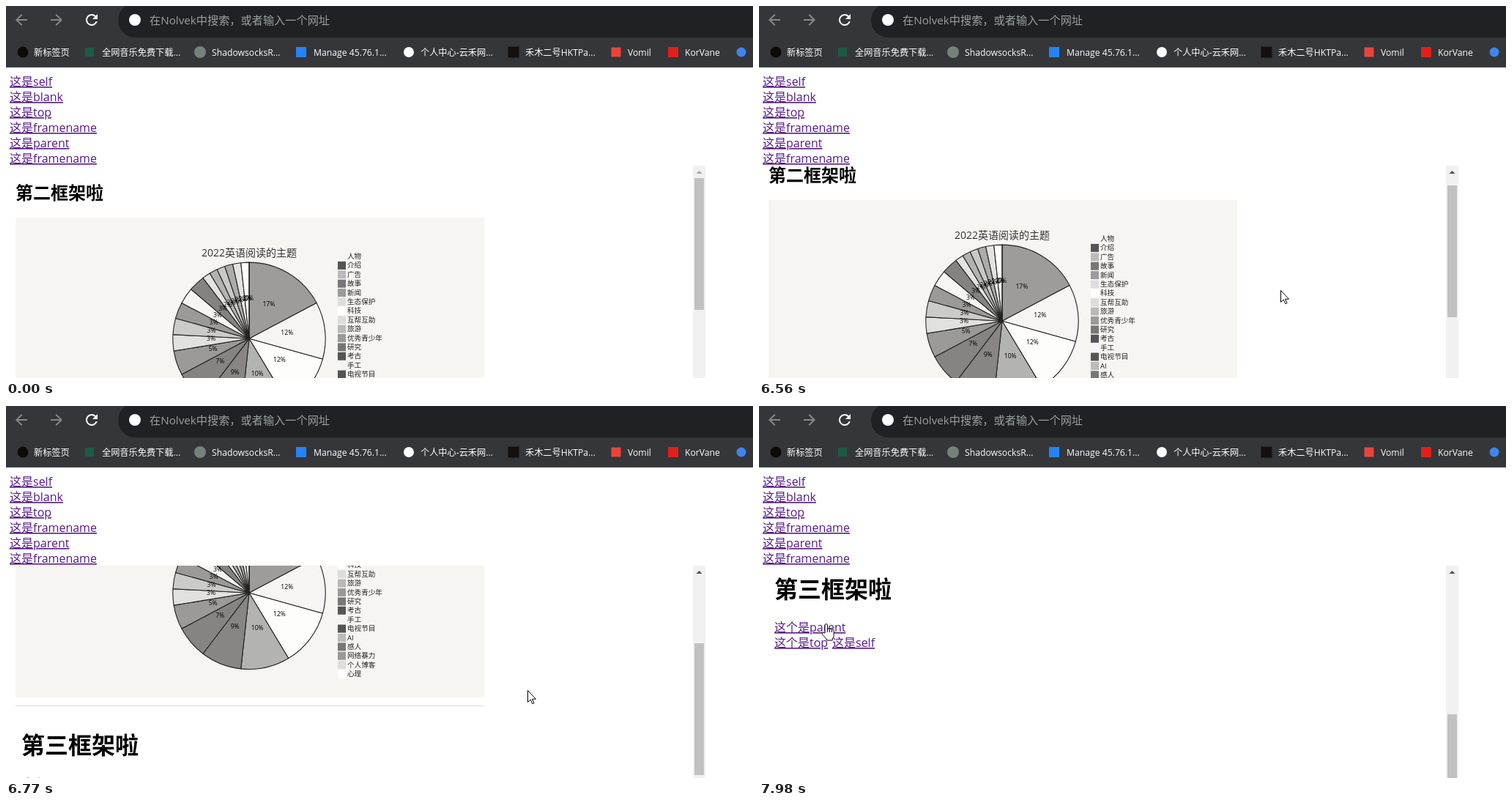
Write an HTML page that moves like this. It is 1020x508 px and loops after 8000 ms.

```html
<!DOCTYPE html>
<html lang="zh-CN">
<head>
<meta charset="utf-8">
<title>框架</title>
<style>
@property --scroll { syntax: "<number>"; inherits: true; initial-value: 0; }
html, body { margin: 0; width: 100%; height: 100%; overflow: hidden; background: #fff; }
svg { display: block; width: 1020px; height: 508px; color: #a3a3a3; animation: scroll 8s step-end infinite; }
text { font: 16px "Open Sans", "Noto Sans CJK SC", "Noto Sans CJK", sans-serif; }
.marks text { font-size: 12.2px; font-weight: 500; fill: #fff; }
.link { fill: #551a8b; text-decoration: underline 1px; }
.h2 { font-size: 24px; font-weight: 700; }
.h1 { font-size: 32px; font-weight: 700; }
.title { font-size: 14px; fill: #333; text-anchor: middle; }
.key { font-size: 9.6px; fill: #222; }
.pct { font-size: 8.6px; text-anchor: middle; }
.doc { transform: translateY(calc(var(--scroll) * -1px)); }
.thumb { transform: translateY(round(down, calc(var(--scroll) * .4515px), 1px)); }
.pointer { animation: move 8s step-end infinite; }
.hand { opacity: 0; animation: grab 8s step-end infinite; }

@keyframes scroll {
  0% { --scroll: 0; color: #a3a3a3; }
  82% { --scroll: 24; color: #505050; }
  82.875% { --scroll: 60; color: #505050; }
  83.75% { --scroll: 109; color: #505050; }
  84.625% { --scroll: 199; color: #505050; }
  85.5% { --scroll: 285; color: #505050; }
  86.375% { --scroll: 353; color: #505050; }
  87.25% { --scroll: 396; color: #505050; }
  88.125%, 100% { --scroll: 412; color: #505050; }
}
@keyframes move {
  0% { transform: translate(-50px, -50px); }
  3.25% { transform: translate(727px, 468px); }
  4.125% { transform: translate(748px, 440px); }
  5% { transform: translate(772px, 414px); }
  5.875% { transform: translate(785px, 400px); }
  7.25% { transform: translate(778px, 394px); }
  8.125% { transform: translate(772px, 392px); }
  13% { transform: translate(756px, 384px); }
  13.875% { transform: translate(718px, 364px); }
  14.75% { transform: translate(688px, 347px); }
  15.625% { transform: translate(677px, 340px); }
  20.75% { transform: translate(690px, 350px); }
  21.625% { transform: translate(738px, 380px); }
  22.5% { transform: translate(812px, 418px); }
  23.375% { transform: translate(884px, 452px); }
  24.25% { transform: translate(930px, 478px); }
  25.125% { transform: translate(944px, 489px); }
  26% { transform: translate(924px, 482px); }
  26.875% { transform: translate(868px, 460px); }
  27.75% { transform: translate(800px, 430px); }
  28.625% { transform: translate(748px, 406px); }
  29.5% { transform: translate(720px, 392px); }
  30.375% { transform: translate(712px, 388px); }
  97.125% { transform: translate(610px, 374px); }
  98% { transform: translate(368px, 340px); }
  98.875% { transform: translate(160px, 308px); }
  99.75%, 100% { transform: translate(-50px, -50px); }
}
@keyframes grab {
  0% { opacity: 0; }
  99.75%, 100% { opacity: 1; }
}
</style>
</head>
<body>
<svg viewBox="0 0 1020 508">
  <clipPath id="view"><rect y="218" width="938" height="290"/></clipPath>
  <clipPath id="track"><rect x="938" y="218" width="17" height="290"/></clipPath>
  <rect width="1020" height="508" fill="#fff"/>

  <rect width="1020" height="83" fill="#35363a"/>
  <rect y="83" width="1020" height="1" fill="#4a4c50"/>
  <rect x="153" y="-4" width="900" height="47" rx="23.5" fill="#202124"/>
  <g fill="#85878a">
    <path id="back" transform="translate(9 7)" d="M20 11H7.830L13.420 5.410L12 4L4 12L12 20L13.410 18.590L7.830 13H20Z"/>
    <use href="#back" transform="matrix(-1 0 0 1 90 0)"/>
    <path fill="#fff" transform="translate(105 7)" d="M17.650 6.350A8 8 0 1 0 19.730 14H17.650A6 6 0 1 1 16.220 7.780L13 11H20V4Z"/>
  </g>
  <circle cx="176" cy="19" r="8" fill="#fff"/>
  <text x="196" y="25" fill="#9aa0a6" style="font-size:15.2px">在Nolvek中搜索，或者输入一个网址</text>
  <g class="marks" id="marks"></g>

  <g id="links"></g>

  <g clip-path="url(#view)">
    <g class="doc">
      <text class="h2" x="13" y="264">第二框架啦</text>
      <rect x="13" y="289" width="640" height="308" fill="#f6f5f2"/>
      <text class="title" x="332" y="342">2022英语阅读的主题</text>
      <g id="chart"></g>
      <rect x="13" y="608" width="640" height="1" fill="#dcdcdc"/>
      <text class="h1" x="21" y="674">第三框架啦</text>
      <text class="link" x="21" y="720">这个是parent</text>
      <text class="link" x="21" y="741">这个是top</text>
      <text class="link" x="100" y="741">这是self</text>
    </g>
  </g>

  <g clip-path="url(#track)">
    <rect x="938" y="218" width="17" height="290" fill="#f1f1f1"/>
    <rect class="thumb" x="940" y="235" width="13" height="180" fill="#c1c1c1"/>
    <path d="M942.500 229L946.500 225L950.500 229Z" fill="currentColor"/>
  </g>

  <g fill="#fff" stroke="#000" stroke-linejoin="round">
    <path class="pointer" d="M.5 .5V16.500L4.200 13L6.800 18.700L9 17.700L6.500 12.200H11.500Z"/>
    <g class="hand"><path transform="translate(85 297)" d="M5 13V2.300a1.700 1.700 0 0 1 3.400 0V8a1.600 1.600 0 0 1 3 .3a1.600 1.600 0 0 1 3 .6a1.500 1.500 0 0 1 2.800 .8V16q0 3-2 5V23H7.500V21.500L2 15.500q-1.600-2-.6-3q1-.9 3.600 .5ZM8.400 8V12M11.400 8.500V12M14.400 9V12"/></g>
  </g>
</svg>
<script>
const byId = id => document.getElementById(id);

function add(parent, tag, attrs, text) {
  const el = document.createElementNS("http://www.w3.org/2000/svg", tag);
  for (const k in attrs) el.setAttribute(k, attrs[k]);
  if (text) el.textContent = text;
  return parent.appendChild(el);
}

// Bookmarks: icon centre, size, corner radius, colour, label position, label
[
  [23, 15, 8, "#0d0b0a", 38, "新标签页"],
  [114, 12, 0, "#1d5a45", 131, "全网音乐免费下载..."],
  [265, 16, 8, "#75827a", 281, "ShadowsocksR..."],
  [403, 14, 0, "#2583f5", 420, "Manage 45.76.1..."],
  [550, 14, 7, "#fff", 566, "个人中心-云禾网..."],
  [693, 15, 0, "#150f10", 709, "禾木二号HKTPa..."],
  [833, 13, 0, "#e8453a", 849, "Vomil"],
  [911, 14, 0, "#e0201b", 927, "KorVane"],
  [1004, 13, 7, "#3f86e8", 0, ""]
].forEach(([cx, size, rx, fill, x, label]) => {
  add(byId("marks"), "rect", { x: cx - size / 2, y: 63 - size / 2, width: size, height: size, rx, fill });
  if (label) add(byId("marks"), "text", { x, y: 68 }, label);
});

["self", "blank", "top", "framename", "parent", "framename"].forEach((name, i) =>
  add(byId("links"), "text", { class: "link", x: 5, y: 109 + 21 * i }, "这是" + name));

// Pie: counts run clockwise from the top
const chart = byId("chart"), cx = 332, cy = 454.3, R = 104.2;
const counts = [10, 7, 7, 6, 5, 4, 3, 2, 2, 2, 2, 2, 1, 1, 1, 1, 1, 1, 0];
const shades = "9e9c9a f6f5f3 fdfdfb b3b3b1 888684 868482 9c9a98 e1e1df cbcbc9 9c9a98 f5f5f3 858381 e3e3e1 b3b3b1 c9c9c7 acacaa e3e3e1 ffffff ffffff".split(" ");
const total = counts.reduce((a, b) => a + b);
const at = (n, r) => {
  const a = n / total * 2 * Math.PI;
  return [cx + r * Math.sin(a), cy - r * Math.cos(a)];
};
let sum = 0;
const labels = counts.map((n, i) => {
  add(chart, "path", {
    d: `M${cx} ${cy}L${at(sum, R)}A${R} ${R} 0 0 1 ${at(sum + n, R)}Z`,
    fill: "#" + shades[i], stroke: "#222", "stroke-width": 1.1, "stroke-linejoin": "round"
  });
  const [x, y] = at(sum + n / 2, R / 2);
  sum += n;
  return [x, y, Math.round(n / total * 100) + "%"];
});
labels.forEach(([x, y, t]) => add(chart, "text", { class: "pct", x, y }, t));

const topics = "人物 介绍 广告 故事 新闻 生态保护 科技 互帮互助 旅游 优秀青少年 研究 考古 手工 电视节目 AI 感人 网络暴力 个人博客 心理".split(" ");
const keys = "f5 55 bb 77 9b dd ff dd b9 9a 77 55 f5 55 bb 77 99 dd ff".split(" ");
topics.forEach((t, i) => {
  const y = 341.5 + 12.39 * i;
  add(chart, "rect", { x: 453, y: y - 5, width: 11, height: 11, fill: "#" + keys[i].repeat(3) });
  add(chart, "text", { class: "key", x: 466, y: y + 3.6 }, t);
});
</script>
</body>
</html>
```
